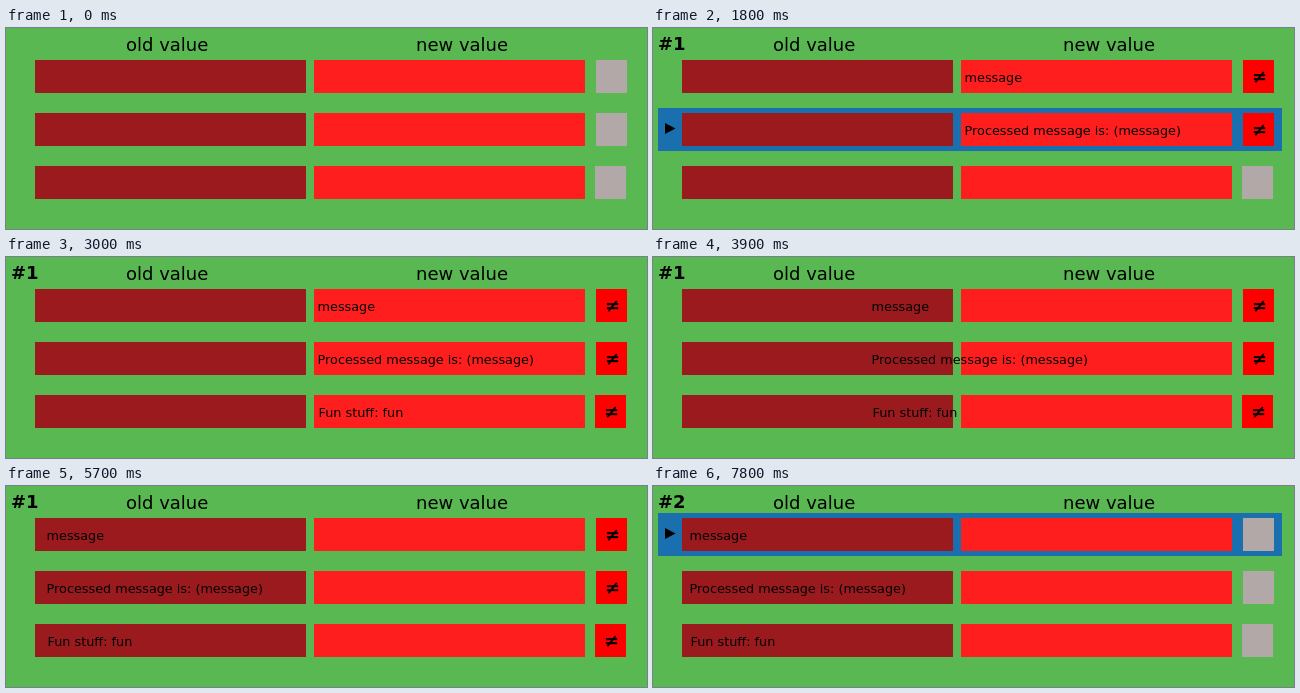
An HTML page with a canvas that plays this animation: 641 by 201 pixels, repeating every 8000 ms.

```html
<!DOCTYPE html>
<html lang="en">
<head>
<meta charset="utf-8">
<title>Old and new values</title>
<style>
html, body { margin: 0; width: 100%; height: 100%; overflow: hidden; background: #5ab852; }
canvas { display: block; }
</style>
</head>
<body>
<canvas id="stage" width="641" height="201"></canvas>
<script>
const ctx = document.getElementById('stage').getContext('2d');
const LOOP = 8000, STEP = 300;
const SLIDE_START = 10, CLEAR_START = 23, SECOND_PASS = 26;
const rows = ['message', 'Processed message is: (message)', 'Fun stuff: fun'];

function box(color, x, y, w, h) {
  ctx.fillStyle = color;
  ctx.fillRect(x, y, w, h);
}

function label(text, x, y, size, weight = 'normal') {
  ctx.fillStyle = '#000';
  ctx.font = `${weight} ${size}px "DejaVu Sans", sans-serif`;
  ctx.fillText(text, x, y);
}

// Distance still to travel: starts from rest, then decays exponentially.
function slideLeft(step) {
  const u = 0.72 * Math.max(0, step - SLIDE_START);
  return Math.floor(275 / (1 + 0.0913 * (Math.exp(u) - 1 - u)));
}

function activeRow(step) {
  if (step >= SECOND_PASS) return 0;
  return step > 0 ? Math.floor((step - 1) / 3) : -1;
}

function drawCursor(y) {
  box('#1a6fae', 5, y - 5, 624, 43);
  ctx.fillStyle = '#000';
  ctx.beginPath();
  ctx.moveTo(12, y + 10);
  ctx.lineTo(22.5, y + 15.5);
  ctx.lineTo(12, y + 21);
  ctx.fill();
}

function drawRow(i, step) {
  const y = 32 + 53 * i;
  const shift = i === 2 ? 1 : 0;
  const changed = step >= 3 * i + 3 && step < CLEAR_START + i;

  if (activeRow(step) === i) drawCursor(y);
  box('#9b1a1e', 29, y, 271, 33);
  box('#ff1e1e', 308, y, 271, 33);
  box(changed ? '#ff0000' : '#b3a8a8', 590 - shift, y, 31, 33);
  if (changed) label('≠', 599 - shift, y + 23, 18, 'bold');
  if (step >= 3 * i + 2) label(rows[i], 36.6 + shift + slideLeft(step), y + 22, 12.8);
}

function draw(step) {
  box('#5ab852', 0, 0, 641, 201);
  label('old value', 120, 23, 18);
  label('new value', 410, 23, 18);
  if (step > 0) label(step < SECOND_PASS ? '#1' : '#2', 5, 22, 18, 'bold');
  rows.forEach((_, i) => drawRow(i, step));
}

const start = performance.now();
function tick() {
  draw(Math.floor(((performance.now() - start) % LOOP) / STEP));
  requestAnimationFrame(tick);
}
tick();
</script>
</body>
</html>
```
